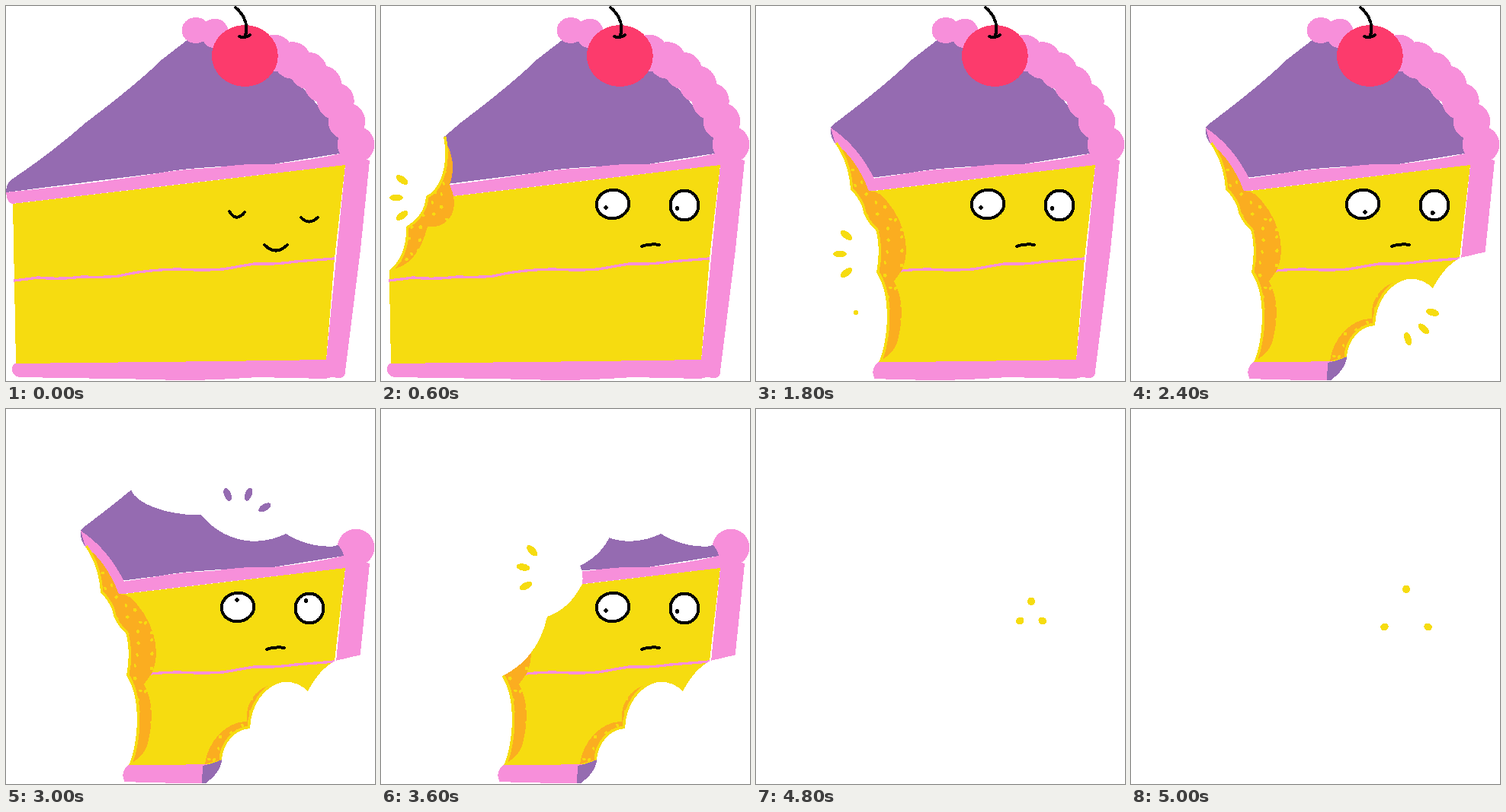
Animation of 484 by 493 pixels, one loop 5200 ms. Source, as an HTML page:

```html
<!DOCTYPE html>
<html lang="en">
<head>
<meta charset="utf-8">
<title>Cake</title>
<style>
html, body { margin: 0; width: 100%; height: 100%; overflow: hidden; background: #fff; }
svg { display: block; width: 484px; height: 493px; shape-rendering: crispEdges; }
.pink { fill: #f78fda; }
.purple { fill: #956bb1; }
.yellow { fill: #f6dc10; }
.red { fill: #fc3b6c; }
.orange { fill: #fbad20; }
.white { fill: #fff; }
.sponge { fill: url(#sponge); }
.rim { fill: none; stroke: #f6dc10; stroke-width: 7; stroke-linejoin: round; }
.layer { fill: none; stroke: #f78fda; stroke-width: 3.4; }
.ink { fill: none; stroke: #000; stroke-width: 4; stroke-linecap: round; }
.eye { fill: #fff; stroke: #000; stroke-width: 4; }
</style>
</head>
<body>
<svg id="stage" viewBox="0 0 484 493" xmlns="http://www.w3.org/2000/svg"></svg>
<script>
const LOOP = 5200;

const shape = (cls, d) => `<path class="${cls}" d="${d}"/>`;
const oval = (cls, x, y, rx, ry = rx, turn = 0) =>
  `<ellipse class="${cls}" cx="${x}" cy="${y}" rx="${rx}" ry="${ry}" transform="rotate(${turn} ${x} ${y})"/>`;
const repeat = (n, make) => Array.from({ length: n }, (_, i) => make(i)).join('');

let seed = 7;
function random() {
  seed = seed * 16807 % 2147483647;
  return seed / 2147483647;
}

// tile of sponge: one pore in each cell of a jittered grid
const CELL = 15, CELLS = 6, TILE = CELL * CELLS;
const sponge = `<defs><pattern id="sponge" width="${TILE}" height="${TILE}" patternUnits="userSpaceOnUse">
  <rect class="orange" width="${TILE}" height="${TILE}"/>` +
  repeat(CELLS * CELLS, i => oval('yellow',
    (i % CELLS + 0.2 + 0.6 * random()) * CELL,
    (Math.floor(i / CELLS) + 0.2 + 0.6 * random()) * CELL,
    1.5 + random(), 2.4, 180 * random())) +
  '</pattern></defs>';

// crumbs fly out from x,y around a direction in degrees
const burst = (cls, x, y, dist, dir, gap, n = 3, rx = 9, ry = 4.5) => repeat(n, i => {
  const turn = dir + (i - (n - 1) / 2) * gap, a = turn * Math.PI / 180;
  return oval(cls, x + dist * Math.cos(a), y + dist * Math.sin(a), rx, ry, turn);
});

// scallops follow a quadratic curve down the back
const bend = (a, b, c, t) => (1 - t) ** 2 * a + 2 * t * (1 - t) * b + t * t * c;
const scallop = t => oval('pink', bend(352, 426, 459, t), bend(62, 84, 182, t), 24.3);

const cake =
  shape('purple', `M0,245 Q0,235 6,229 Q60,193 105,153 Q170,104 205,70 L240,43 L350,60
    L450,180 L443,193 L350,208 Q235,212 205,219 Z`) +
  shape('pink', `M0,245 Q120,233 205,219 Q235,214 270,213 Q320,206 350,208
    Q400,203 443,193 L477,203 L465,320 L445,480 Q445,490 435,489 Q426,487 419,490
    L330,488 Q240,494 200,491 L18,488 C5,486 5,472 14,469 L420,465 L445,209 L8,260 Q1,258 0,245 Z`) +
  shape('yellow', 'M9,260 L250,232 L445,209 L431,331 L420,465 L280,467 L13,470 Z') +
  shape('layer', `M10,361 Q28,359 42,357 Q70,360 100,356 Q130,357 148,355 Q180,347 225,346
    Q260,348 285,346 L325,339 Q355,340 380,336 L431,332`) +
  repeat(7, i => scallop(i / 6)) +
  oval('pink', 249, 32, 18.5, 17) + oval('pink', 274, 36, 18, 19.5) +
  oval('red', 313.3, 65.5, 43.5, 40.5) +
  shape('ink', 'M301,2 C312,11 318,24 314,39 M306,40 Q313,43 320,38');

// a bite shows sponge between the cut and an inner edge, and clears what lies outside
const bite = (cut, inner, outside) =>
  shape('sponge', `${cut} ${inner} Z`) + shape('rim', cut) + shape('white', `${cut} ${outside} Z`);

const tipBite = bite(
  'M82,172 C89,205 80,240 59,250 C58,270 46,282 33,290 C34,315 26,336 11,347',
  'Q48,342 61,290 C88,294 106,268 90,235 Q101,203 82,174',
  'L-5,348 L-5,145 L60,145');

const baseBite = bite(
  'M11,350 C45,356 68,378 74,409 L98,432 C109,435 119,447 125,464 Q140,472 154,492',
  'L154,482 L136,467 C137,432 117,406 95,407 C88,376 60,355 24,353',
  'L154,500 L-5,500 L-5,350');

const leftBite =
  shape('pink', 'M98,160 Q134,184 155,227 L157,243 L128,240 L104,181 Z') +
  bite(
    `M104,181 Q122,207 124,242 Q132,248 139,263 Q142,282 157,294
      Q164,320 158,350 C178,380 174,435 162,467`,
    'Q184,455 187,435 Q197,390 181,362 L191,348 C206,318 192,272 160,245 L148,243 Q130,198 104,181',
    'Q151,475 154,485 L158,500 L-5,500 L-5,135 L80,135 L98,160 Q97,172 104,181');

const underBite = bite(
  'M396,371 Q382,357 362,359 C338,365 321,390 320,420 C300,421 284,440 283,461',
  'L261,467 C264,437 290,410 316,411 C312,383 334,359 366,359',
  'Q282,477 262,492 L262,500 L490,500 L490,321 L466,323 L432,331 Q411,342 396,371') +
  shape('purple', 'M258,469 Q272,466 283,461 Q282,477 262,492 L257,492 Z');

const topBite =
  shape('white', `M164,106 C170,126 218,141 256,139 Q283,172 325,174 Q350,173 367,164
    Q400,184 436,180 L490,180 L490,-5 L150,-5 L150,90 Z`) +
  scallop(1) + shape('purple', 'M425,182 L435,179 Q441,184 443,193 L425,196 Z');

const sideBite = shape('white', `M300,168 Q288,193 261,206 Q266,216 264,230
  Q247,263 218,273 Q205,330 157,352 L80,352 L80,90 L260,90 Z`);

const lastBite = shape('white', `M218,273 Q250,283 280,350 Q318,350 345,370
  L345,500 L90,500 L90,273 Z`);

const asleep = shape('ink', `M293,270 Q302,285 313,271 M387,278 Q397,289 409,278
  M339,314 Q354,329 369,314`);

const look = (dx, dy) =>
  oval('eye', 304, 260.5, 21.3, 18.7, -8) + oval('eye', 398, 262, 18.5, 19.5) +
  shape('ink', 'M342,316 Q352,312 365,314') +
  oval('', 304 + dx, 261 + dy, 2.8) + oval('', 394 + dx * 0.6, 262 + dy, 2.8);

const lookLeft = look(-9, 4), lookDown = look(3, 10);
const eaten = cake + leftBite + underBite + topBite;
const dots = dist => burst('yellow', 361, 270, dist, 270, 120, 3, 5.4, 4.8);

// start time and picture of each step
const steps = [
  [0, cake + asleep],
  [400, cake + lookLeft],
  [600, cake + tipBite + lookLeft + burst('yellow', 60, 252, 40, 180, 36)],
  [1200, cake + tipBite + baseBite + look(-5, 9) + burst('yellow', 72, 428, 48, 138, 70, 2, 8.5, 5.5)],
  [1800, cake + leftBite + lookLeft + burst('yellow', 150, 326, 40, 180, 38) + oval('yellow', 131, 403, 3)],
  [2400, cake + leftBite + underBite + lookDown + burst('yellow', 348, 391, 49, 43, 29)],
  [3000, eaten + look(-1, -10) + burst('purple', 305, 150, 40, 289, 40)],
  [3600, eaten + sideBite + lookLeft + burst('yellow', 226, 215, 40, 190, 36)],
  [4200, eaten + sideBite + lastBite + lookDown + burst('yellow', 304, 375, 32, 96, 41)],
  [4800, dots(17)],
  [5000, dots(33)]
];

const stage = document.getElementById('stage');
stage.innerHTML = sponge + steps.map(([, art]) => `<g display="none">${art}</g>`).join('');
const scenes = [...stage.querySelectorAll('svg > g')];
let shown = -1;

function draw(t) {
  const next = steps.filter(([at]) => at <= t).length - 1;
  if (next === shown) return;
  scenes.forEach((g, i) => g.setAttribute('display', i === next ? 'inline' : 'none'));
  shown = next;
}

const start = performance.now();
function tick() {
  draw((performance.now() - start) % LOOP);
  requestAnimationFrame(tick);
}
tick();
</script>
</body>
</html>
```
